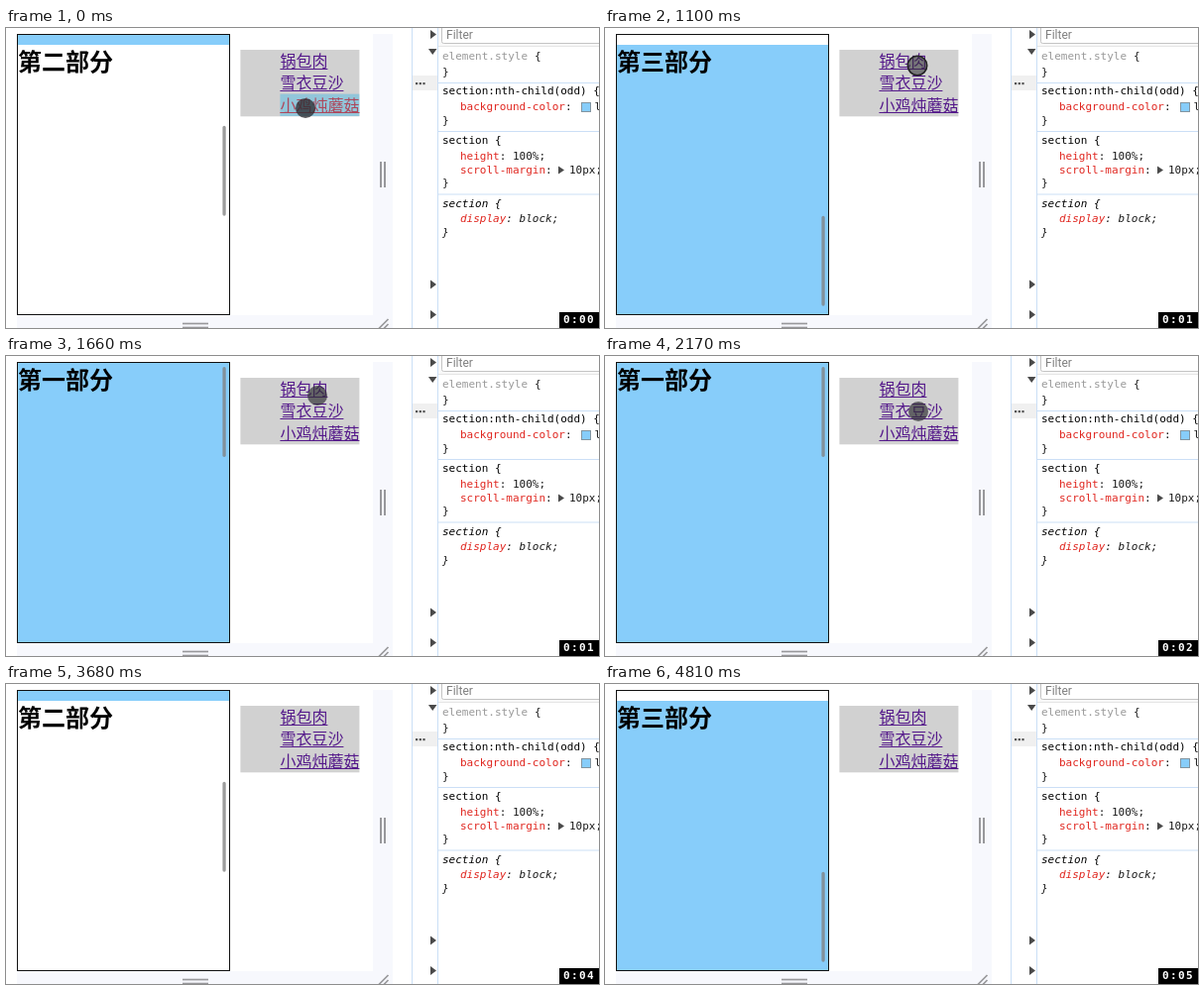
Animation, 598 px wide and 303 px high, one loop 5320 ms. Source, as an HTML page with a canvas:

```html
<!DOCTYPE html>
<html lang="zh-CN">
<head>
<meta charset="utf-8">
<title>scroll-margin</title>
<style>
html, body { margin: 0; width: 100%; height: 100%; overflow: hidden; background: #fff; }
canvas { display: block; width: 598px; height: 303px; }
</style>
</head>
<body>
<canvas id="stage" width="598" height="303"></canvas>
<script>
const ctx = document.getElementById('stage').getContext('2d');
const LOOP = 5320;
const CJK = '"Noto Sans CJK SC", "Noto Sans CJK", sans-serif';
const MONO = '11px "DejaVu Sans Mono", monospace';
const SKY = '#87cdfa';
const LINE = '#cbdff6';
const GRIP = '#98989b';
const VIEW = { x: 12, y: 7, w: 214, h: 283 };
const TITLES = ['第一部分', '第二部分', '第三部分'];
const LINKS = ['锅包肉', '雪衣豆沙', '小鸡炖蘑菇'];
const START_SCROLL = 273;

// Taps: touch down, highlight on/off, scroll start, link index, scroll goal
const taps = [
  { down: -200, on: -60, off: 130, scroll: 70, link: 2, goal: 556 },
  { down: 1040, on: 1222, off: 1350, scroll: 1275, link: 0, goal: 0 },
  { down: 2281, on: 2380, off: 2520, scroll: 2460, link: 1, goal: 273 },
  { down: 4250, on: 4330, off: 4470, scroll: 4400, link: 2, goal: 556 }
];

const smooth = p => p * p * (3 - 2 * p);
const linear = p => p;
const easeIn = p => p * p;
const easeOut = p => p * (2 - p);

// Pointer keys: time, x, y, easing towards this key
const visits = [
  [
    [0, 302, 81], [530, 302, 81], [1030, 315, 38, smooth], [1220, 315, 38],
    [1470, 314, 40, smooth], [2000, 314, 40], [2150, 316, 56, smooth],
    [2540, 316, 56], [2720, 319, 71, easeIn], [3070, 551, 267, smooth],
    [3230, 552, 315, linear]
  ],
  [
    [3740, 553, 315], [4050, 320, 82, easeOut], [4130, 313, 70, smooth],
    [4450, 313, 70], [4780, 560, 293, smooth], [4809, 560, 293]
  ]
];

// cubic-bezier(.42, 0, .58, 1)
function easeInOut(p) {
  if (p <= 0) return 0;
  if (p >= 1) return 1;
  let lo = 0, hi = 1, u = 0.5;
  for (let i = 0; i < 18; i++) {
    u = (lo + hi) / 2;
    const v = 1 - u;
    const x = 1.26 * v * v * u + 1.74 * v * u * u + u * u * u;
    if (x < p) lo = u; else hi = u;
  }
  return smooth(u);
}

function scrollAt(t) {
  let pos = START_SCROLL;
  for (const tap of taps) {
    const delta = tap.goal - pos;
    const duration = Math.sqrt(Math.abs(delta)) / 60 * 1000;
    const p = (t - tap.scroll) / duration;
    if (p < 1) return Math.floor(pos + delta * easeInOut(p));
    pos = tap.goal;
  }
  return pos;
}

function pointerAt(t) {
  for (const keys of visits) {
    for (let i = 1; i < keys.length; i++) {
      const [t0, x0, y0] = keys[i - 1];
      const [t1, x1, y1, ease = linear] = keys[i];
      if (t >= t0 && t < t1) {
        const p = ease((t - t0) / (t1 - t0));
        return { x: x0 + (x1 - x0) * p, y: y0 + (y1 - y0) * p };
      }
    }
  }
  return null;
}

function rect(x, y, w, h, color) {
  ctx.fillStyle = color;
  ctx.fillRect(x, y, w, h);
}

function text(str, x, y, color, font) {
  ctx.font = font;
  ctx.fillStyle = color;
  ctx.fillText(str, x, y);
}

function pill(x, y, w, h, color) {
  ctx.fillStyle = color;
  ctx.beginPath();
  ctx.roundRect(x, y, w, h, Math.min(w, h) / 2);
  ctx.fill();
}

function poly(points, color) {
  ctx.fillStyle = color;
  ctx.beginPath();
  points.forEach(([x, y]) => ctx.lineTo(x, y));
  ctx.fill();
}

const arrowRight = (x, y, w, h) => poly([[x, y], [x + w, y + h / 2], [x, y + h]], '#4a4a4a');

function drawFrame() {
  rect(0, 0, 598, 303, '#fff');
  rect(370, 6, 20, 297, '#f7f8fd');
  rect(11, 290, 379, 13, '#f7f8fd');
  for (const d of [0, 4]) {
    rect(377 + d, 135, 2, 26, GRIP);
    rect(178, 297.7 + d, 26, 1.7, GRIP);
  }
  ctx.strokeStyle = GRIP;
  ctx.lineWidth = 1.7;
  ctx.beginPath();
  ctx.moveTo(376, 303.5); ctx.lineTo(385.5, 294);
  ctx.moveTo(381, 303.5); ctx.lineTo(385.5, 299);
  ctx.stroke();
}

function drawSections(scroll) {
  const { x, y, w, h } = VIEW;
  ctx.save();
  ctx.beginPath();
  ctx.rect(x, y, w, h);
  ctx.clip();
  TITLES.forEach((title, i) => {
    const top = y + i * h - scroll;
    if (i % 2 === 0) rect(x, top, w, h, SKY);
    text(title, x, top + 26, '#000', 'bold 24px ' + CJK);
  });
  ctx.restore();
  pill(218.4, 11 + scroll * 0.3215, 3.3, 91, 'rgba(128,128,128,.78)');
  ctx.strokeStyle = '#111';
  ctx.lineWidth = 1;
  ctx.strokeRect(11.5, 6.5, 214, 283);
}

function drawLinks(t) {
  rect(236.4, 22, 120, 67.3, '#d1d1d1');
  LINKS.forEach((label, i) => {
    const active = taps.some(tap => tap.link === i && t >= tap.on && t < tap.off);
    const color = active ? '#f00' : '#551a8b';
    const base = 39 + i * 22.33;
    const width = label.length * 16;
    text(label, 276.4, base, color, '16px ' + CJK);
    rect(276.4, Math.floor(base + 2), width, 1, color);
    if (active) rect(276.4, base - 17, width, 22.33, 'rgba(51,181,229,.4)');
  });
}

function drawStyles() {
  const RED = '#e0261f', INK = '#1a1a1a';
  rect(409, 0, 1, 303, LINE);
  rect(410, 48, 25, 15, '#f0f0f0');
  for (let i = 0; i < 3; i++) rect(413 + i * 3.7, 55, 2.2, 2.2, '#555');
  rect(435, 0, 1, 303, LINE);
  for (const y of [2, 254.5, 285]) arrowRight(428, y, 6, 9);
  poly([[426, 21], [434.5, 21], [430.2, 27]], '#4a4a4a');

  rect(436, 0, 162, 18, '#f8f8f8');
  rect(436, 18, 162, 1, '#e6e6e6');
  ctx.strokeStyle = '#c4c4c4';
  ctx.lineWidth = 1;
  ctx.beginPath();
  ctx.roundRect(439.5, -8.5, 180, 24, 2);
  ctx.fillStyle = '#fff';
  ctx.fill();
  ctx.stroke();
  text('Filter', 444, 11, '#808080', '12px Roboto, sans-serif');

  for (const y of [55, 104, 167.5]) rect(436, y, 162, 1, LINE);
  const code = (str, x, y, color, style = '') => text(str, x, y, color, style + MONO);
  const prop = (name, value, y, style) => {
    code(name, 458, y, RED, style);
    code(':' + value, 458 + ctx.measureText(name).width, y, INK, style);
  };
  code('element.style', 440, 32, '#999');
  code('{', 533, 32, INK);
  code('}', 440, 48, INK);
  code('section:nth-child(odd) {', 440, 67, '#000');
  prop('background-color', '', 83);
  rect(580, 75, 10, 10, '#8395a0');
  rect(581, 76, 8, 8, SKY);
  code('lightskyblue;', 593.5, 83, INK);
  code('}', 440, 97, INK);
  code('section {', 440, 117, '#000');
  prop('height', ' 100%;', 133);
  prop('scroll-margin', '', 147);
  arrowRight(557, 139.5, 6, 8);
  code('10px;', 568, 147, INK);
  code('}', 440, 160, INK);
  code('section {', 440, 180.5, '#000', 'italic ');
  prop('display', ' block;', 196, 'italic ');
  code('}', 440, 210, INK, 'italic ');
}

function drawPointer(t) {
  const p = pointerAt(t);
  if (!p) return;
  const held = taps.some(tap => t >= tap.down && t < tap.on);
  const lit = taps.some(tap => t >= tap.on && t < tap.off);
  ctx.beginPath();
  ctx.arc(p.x, p.y, held ? 9.7 : 10, 0, Math.PI * 2);
  ctx.fillStyle = `rgba(45,45,50,${held ? 0.55 : lit ? 0.78 : 0.68})`;
  ctx.fill();
  if (held) {
    ctx.strokeStyle = '#222';
    ctx.lineWidth = 1.6;
    ctx.stroke();
  }
}

function drawClock(t) {
  const seconds = [780, 1740, 2740, 3680, 4650].filter(tick => t >= tick).length;
  rect(558, 287, 40, 16, '#000');
  [...`0:0${seconds}`].forEach((ch, i) =>
    text(ch, 562 + i * 8, 298, '#fff', 'bold 11px "DejaVu Sans Mono", monospace'));
}

function draw(t) {
  drawFrame();
  drawSections(scrollAt(t));
  drawLinks(t);
  drawStyles();
  drawPointer(t);
  drawClock(t);
}

const begin = performance.now();
function tick() {
  draw((performance.now() - begin) % LOOP);
  requestAnimationFrame(tick);
}
tick();
</script>
</body>
</html>
```
